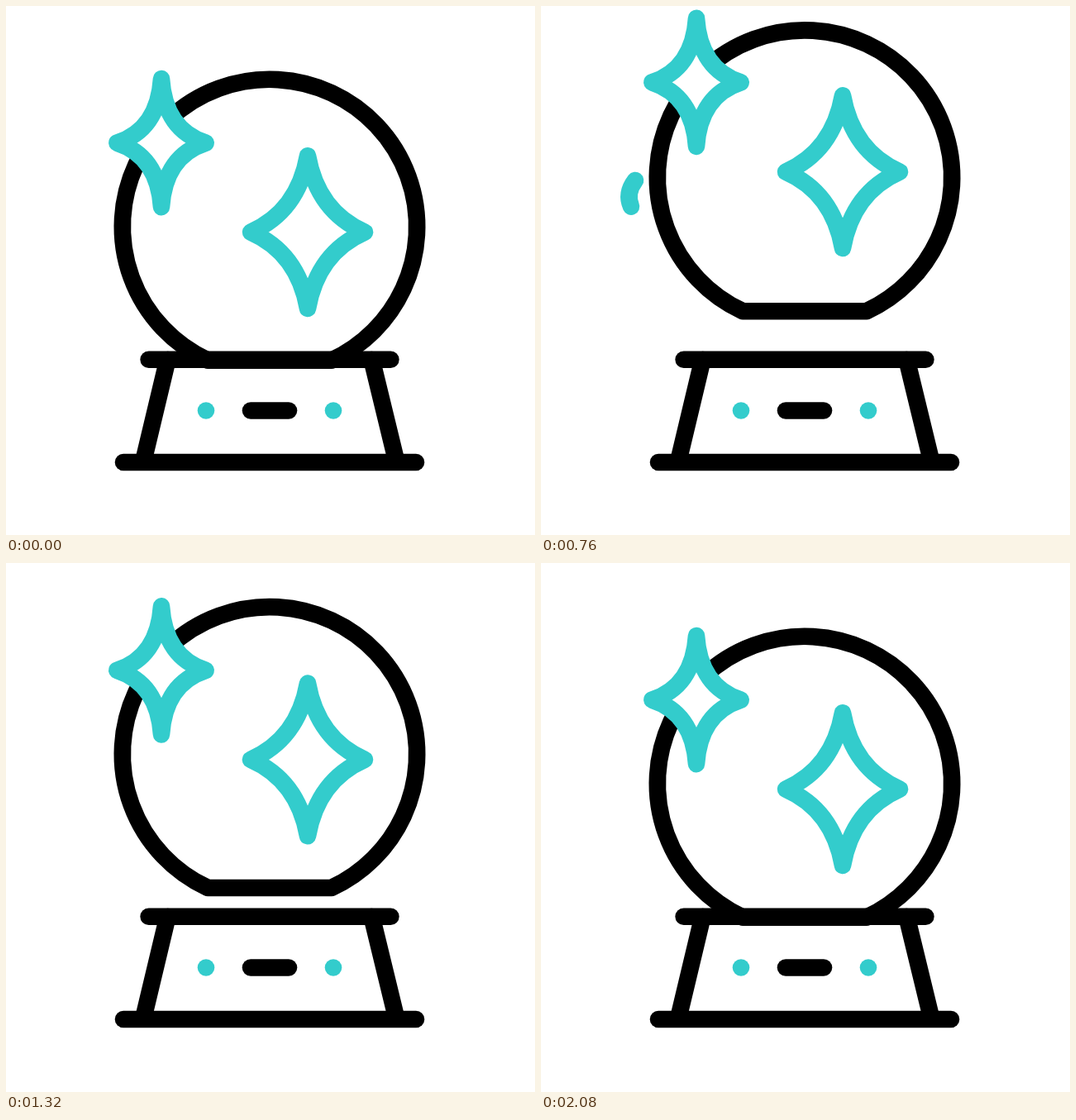
An HTML page with a canvas for the animation above (2.16 s loop, 640 px wide and 640 px high).

```html
<!DOCTYPE html>
<html lang="en">
<head>
<meta charset="utf-8">
<title>Crystal ball</title>
<style>
  html, body { margin: 0; width: 100%; height: 100%; overflow: hidden; background: #fff; }
  canvas { display: block; width: 640px; height: 640px; }
</style>
</head>
<body>
<canvas id="stage" width="640" height="640"></canvas>
<script>
const ctx = document.getElementById('stage').getContext('2d');
const LOOP = 2160, STEP = 40;
const BLACK = '#000', TEAL = '#33cccc';
const LINE = 20.6;

// Smooth 0..1 progress between two times
function ease(t, from, to) {
  const u = Math.min(1, Math.max(0, (t - from) / (to - from)));
  return u * u * (3 - 2 * u);
}

// Rise to a peak, fall to the hover height, later settle on the base
function lift(t, peak, fallStart, fallEnd) {
  const hover = 35.7;
  return -peak * ease(t, 120, 640)
    + (peak - hover) * ease(t, fallStart, fallEnd)
    + hover * ease(t, 1600, 2080);
}

// Shrink and grow back
function pulse(t, min) {
  return 1 - (1 - min) * (ease(t, 760, 1040) - ease(t, 1040, 1320));
}

function line(x1, y1, x2, y2) {
  ctx.beginPath();
  ctx.moveTo(x1, y1);
  ctx.lineTo(x2, y2);
  ctx.stroke();
}

function dot(x, y) {
  ctx.beginPath();
  ctx.arc(x, y, LINE / 2, 0, 7);
  ctx.fill();
}

function drawBase() {
  ctx.strokeStyle = BLACK;
  line(172.6, 427.8, 465.4, 427.8);
  line(142, 552, 496, 552);
  line(195.5, 428, 166, 551.5);
  line(442.5, 428, 472.5, 551.5);
  line(296, 489.5, 342, 489.5);
  ctx.fillStyle = TEAL;
  dot(242, 489.5);
  dot(396, 489.5);
}

function drawBall(dy) {
  const r = 178.2, half = Math.acos(75 / r);
  ctx.strokeStyle = BLACK;
  ctx.beginPath();
  ctx.arc(319, 267 + dy, r, Math.PI - half, half);
  ctx.closePath();
  ctx.stroke();
}

// Four-pointed star: half width w, half height h, bend point (bx, by)
function drawStar(x, y, s, w, h, bx, by) {
  w *= s; h *= s; bx *= s; by *= s;
  ctx.beginPath();
  ctx.moveTo(x, y - h);
  ctx.quadraticCurveTo(x + bx, y - by, x + w, y);
  ctx.quadraticCurveTo(x + bx, y + by, x, y + h);
  ctx.quadraticCurveTo(x - bx, y + by, x - w, y);
  ctx.quadraticCurveTo(x - bx, y - by, x, y - h);
  ctx.closePath();
  ctx.fillStyle = '#fff';
  ctx.fill();
  ctx.strokeStyle = TEAL;
  ctx.stroke();
}

const orbit = { x: 319.5, y: 231, rx: 213, ry: 76, over: 0.266 };
orbit.length = (() => {
  const n = 800, span = Math.PI + 2 * orbit.over;
  let sum = 0;
  for (let i = 0; i < n; i++) {
    const a = -orbit.over + span * (i + 0.5) / n;
    sum += Math.hypot(orbit.rx * Math.sin(a), orbit.ry * Math.cos(a));
  }
  return sum * span / n;
})();

function drawStreak(t) {
  if (t < 680 || t >= 1120) return;
  const head = ease(t, 705, 1060) * orbit.length;
  const tail = ease(t, 760, 1120) * orbit.length;
  ctx.save();
  ctx.strokeStyle = TEAL;
  ctx.setLineDash([Math.max(0.1, head - tail), 5000]);
  ctx.lineDashOffset = -tail;
  ctx.beginPath();
  ctx.ellipse(orbit.x, orbit.y, orbit.rx, orbit.ry, 0,
    Math.PI + orbit.over, -orbit.over, true);
  ctx.stroke();
  ctx.restore();
}

function draw(t) {
  ctx.fillStyle = '#fff';
  ctx.fillRect(0, 0, 640, 640);
  ctx.lineWidth = LINE;
  ctx.lineCap = ctx.lineJoin = 'round';
  drawBase();
  drawBall(lift(t, 66, 640, 1040));
  drawStar(365, 273.6 + lift(t, 79, 640, 1150), pulse(t, 0.44), 69, 92.3, 12, 25);
  drawStar(188, 165.6 + lift(t, 76, 680, 1180), pulse(t, 0.57), 53.7, 77.5, 4, 16);
  drawStreak(t);
}

function tick() {
  const t = performance.now() % LOOP;
  draw(Math.floor(t / STEP) * STEP);
  requestAnimationFrame(tick);
}
tick();
</script>
</body>
</html>
```
